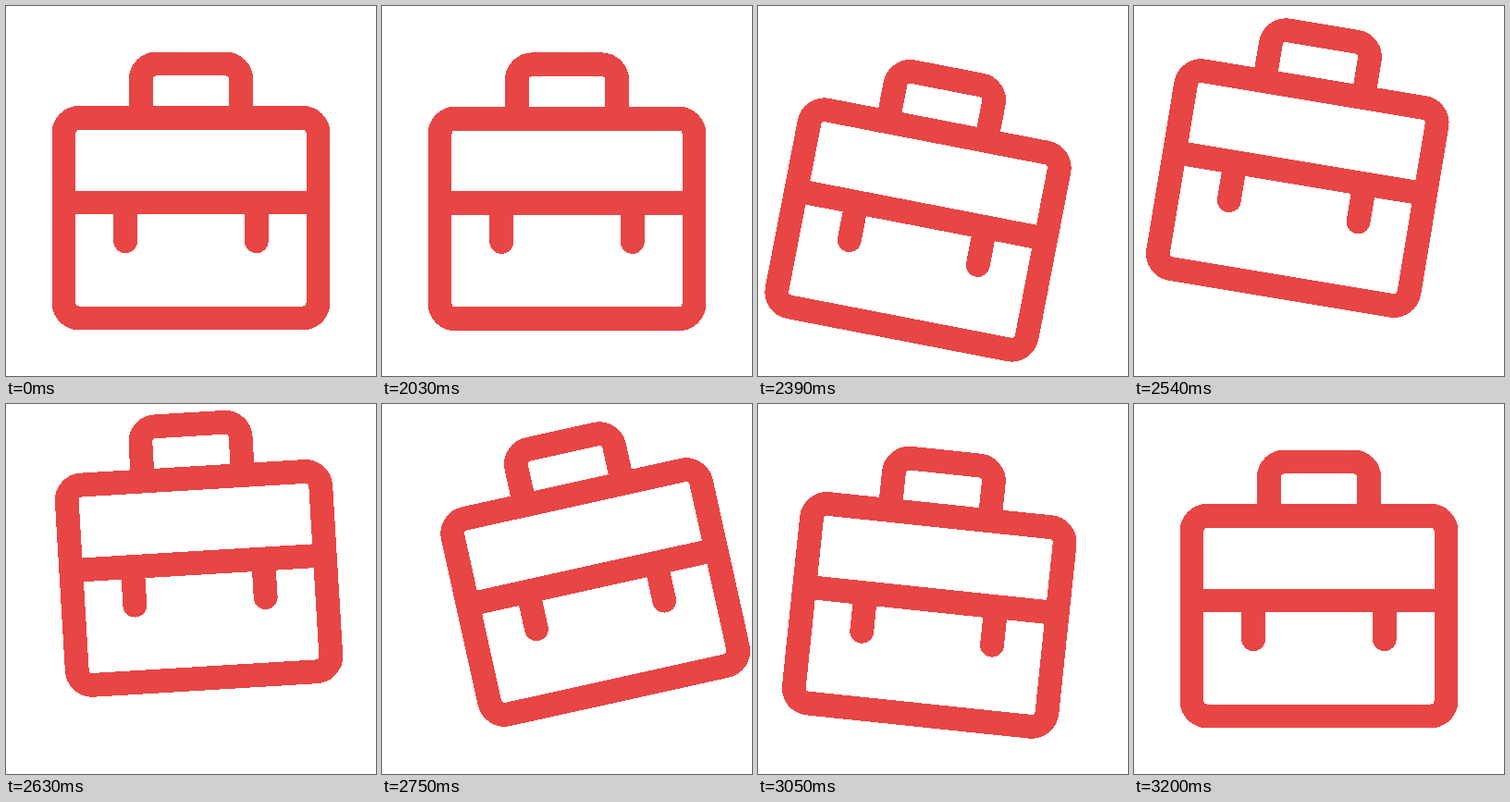
Write an HTML page that moves like this. It is 400 px wide and 400 px high and loops after 3260 ms.

```html
<!DOCTYPE html>
<html lang="en">
<head>
<meta charset="utf-8">
<title>Briefcase</title>
<style>
  html, body { margin: 0; height: 100%; overflow: hidden; background: #fff; }
  svg { display: block; width: 100%; height: 100%; }
</style>
</head>
<body>
<svg viewBox="0 0 400 400" shape-rendering="crispEdges">
  <g id="briefcase" fill="none" stroke="#e84545" stroke-width="25.8">
    <rect x="62.5" y="120.8" width="275" height="216.7" rx="16.7"/>
    <path d="M145.8 120.8V79.2a16.7 16.7 0 0 1 16.7-16.7h75a16.7 16.7 0 0 1 16.7 16.7v41.6M62.5 212.5h275"/>
    <path d="M129.2 220v34.2M270.8 220v34.2" stroke-linecap="round"/>
  </g>
</svg>
<script>
  const LOOP = 3260, REST = 2000, STEP = 30, LAST_STEP = 40;

  // Keys are [step, value], eased in and out between neighbours.
  const LIFT = [[0, 0], [10, 29], [20.6, -40.7], [30, 0]];
  const TILT = [[2, 0], [16.2, 12.6], [24.4, -13], [31.3, 9.8], [40, 0]];

  const briefcase = document.getElementById('briefcase');
  const smooth = p => p * p * (3 - 2 * p);

  function valueAt(keys, step) {
    if (step <= keys[0][0]) return keys[0][1];
    const next = keys.findIndex(key => key[0] > step);
    if (next < 0) return keys[keys.length - 1][1];
    const [s0, v0] = keys[next - 1], [s1, v1] = keys[next];
    return v0 + (v1 - v0) * smooth((step - s0) / (s1 - s0));
  }

  function draw() {
    const time = performance.now() % LOOP;
    const step = Math.min(LAST_STEP, Math.max(0, Math.floor((time - REST) / STEP)));
    briefcase.setAttribute('transform',
      `translate(0 ${valueAt(LIFT, step)}) rotate(${valueAt(TILT, step)} 200 87.5)`);
    requestAnimationFrame(draw);
  }
  draw();
</script>
</body>
</html>
```
